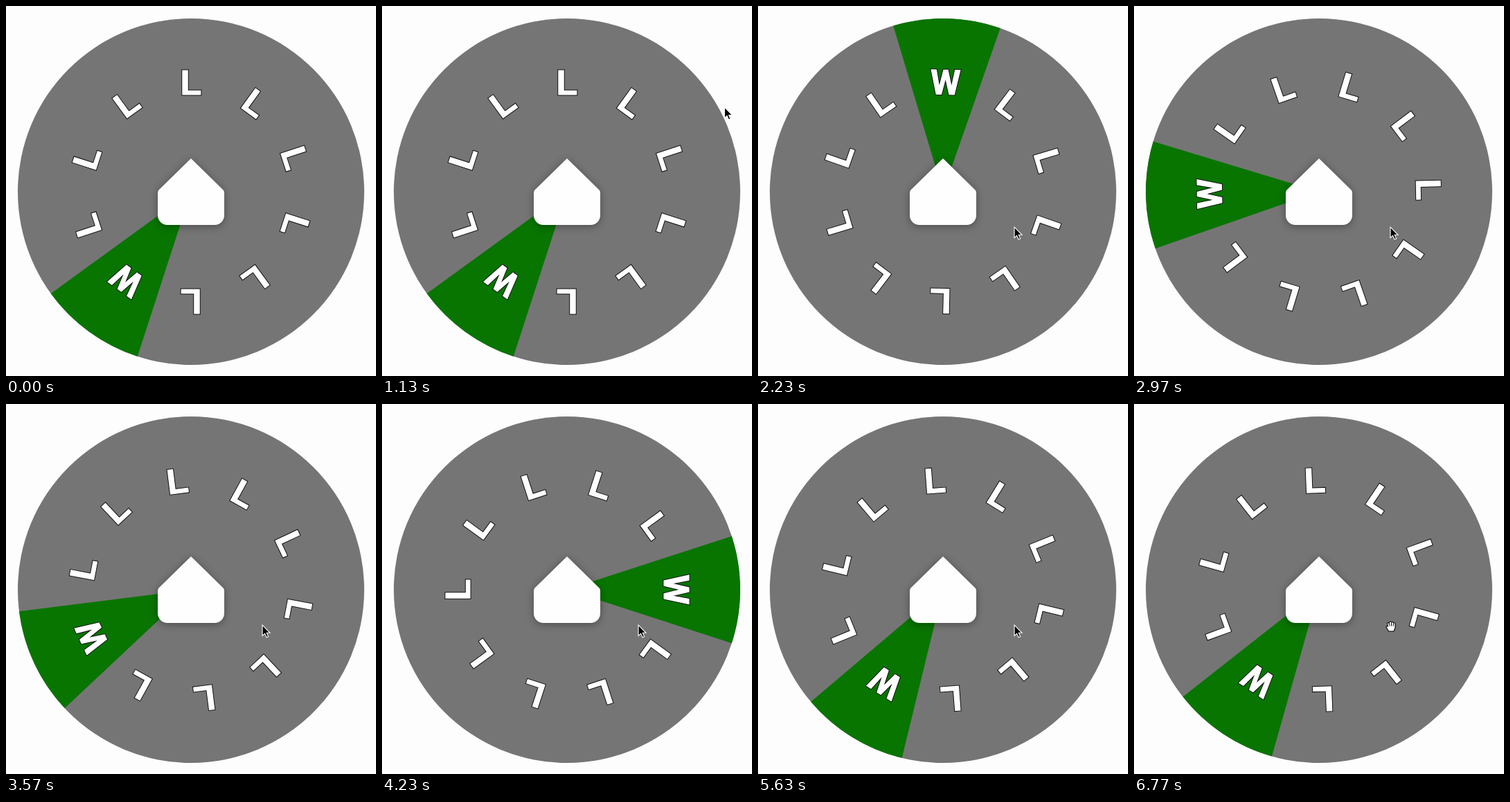
Write an HTML page that moves like this. It is 534 px wide and 534 px high and loops after 6.8 s.

```html
<!DOCTYPE html>
<html lang="en">
<head>
<meta charset="utf-8">
<title>Wheel</title>
<style>
  html, body { margin: 0; width: 100%; height: 100%; overflow: hidden; background: #fdfdfd; }
  svg { display: block; width: 100vw; height: 100vh; }
  text {
    font: bold 50.5px "Liberation Sans", Arial, sans-serif;
    text-anchor: middle;
    fill: #fff; stroke: #fff; stroke-width: 1.2;
  }
  .win { font: bold 49.5px Roboto, sans-serif; }
  .edge { stroke: #111; stroke-width: 3.2; }
  #hub { filter: drop-shadow(0 2px 6px rgba(0, 0, 0, .36)); }
</style>
</head>
<body>
<svg viewBox="0 0 534 534">
  <circle cx="267" cy="268" r="250" fill="#757575"/>
  <g id="wheel"></g>
  <path id="hub" fill="#fefefe"
    d="M267 220 L313.5 265.5 Q315 267 315 270 V302 A14 14 0 0 1 301 316 H233 A14 14 0 0 1 219 302 V270 Q219 267 220.5 265.5 Z"/>
  <g id="arrow">
    <path d="M0 0 V15.5 L3.6 12.3 L6 17.8 L8.6 16.7 L6.2 11.3 H11 Z" fill="#000" stroke="#fff" stroke-width="1.1"/>
  </g>
  <g id="hand" transform="translate(371 321)">
    <path d="M-3.5 7 L-7 1 Q-7.5 -1 -4.5 0 L-5.5 -4.5 Q-4.5 -6.5 -3 -4.5 L-2.5 -6 Q-1 -8 .5 -6 Q2.5 -7.5 3.5 -5 Q6 -6 6 -3.5 V2 L4 7 Z"
      fill="#fff" stroke="#000" stroke-width="1.1" stroke-linejoin="round"/>
    <path d="M-2.6 -4.5 L-2 -.5 M.5 -5.5 V-.5 M3.5 -4.5 L3 -.5" fill="none" stroke="#000"/>
  </g>
</svg>
<script>
const LOOP = 6800, SLICES = 10, RADIUS = 250, HAND_FROM = 6730;
const $ = id => document.getElementById(id);

// [ms, degrees, degrees per second]
const spin = [
  [1670, 216, 0], [1870, 332.5, 1130], [2230, 720.3, 1010], [2970, 1348.2, 680],
  [4230, 1889.8, 182], [5030, 1982.2, 72], [5820, 2013.8, 0]
];
// [ms, x, y]
const pointer = [[970, 513, 126], [1600, 440, 205], [1870, 387, 304.3], [2100, 370, 319]];

function build() {
  const half = Math.PI / SLICES;
  const x = RADIUS * Math.sin(half), y = -RADIUS * Math.cos(half);
  let parts = `<path fill="#087500" d="M0 0 L${-x} ${y} A${RADIUS} ${RADIUS} 0 0 1 ${x} ${y} Z"/>`;
  for (let i = 0; i < SLICES; i++) {
    const [letter, kind] = i === 0 ? ["W", "win"] : ["L", "lose"];
    // A wide dark copy behind the letter forms its outline.
    for (const layer of ["edge", ""]) {
      parts += `<text y="-140.5" class="${kind} ${layer}" transform="rotate(${i * 360 / SLICES})"${layer ? ' aria-hidden="true"' : ""}>${letter}</text>`;
    }
  }
  $("wheel").innerHTML = parts;
}

// Finds the key pair around t and the fraction between them.
function span(keys, t) {
  const last = keys.length - 1;
  let i = 0;
  while (i < last - 1 && t >= keys[i + 1][0]) i++;
  const a = keys[i], b = keys[i + 1];
  return { a, b, u: Math.min(1, Math.max(0, (t - a[0]) / (b[0] - a[0]))) };
}

function angleAt(t) {
  const { a, b, u } = span(spin, t);
  const seconds = (b[0] - a[0]) / 1000, w = 1 - u;
  return a[1] * (1 + 2 * u) * w * w + b[1] * u * u * (3 - 2 * u)
    + seconds * u * w * (a[2] * w - b[2] * u);
}

function pointerAt(t) {
  const { a, b, u } = span(pointer, t);
  return [1, 2].map(k => a[k] + (b[k] - a[k]) * u);
}

function draw(t) {
  $("wheel").setAttribute("transform", `translate(267 268) rotate(${angleAt(t)})`);
  $("arrow").setAttribute("transform", `translate(${pointerAt(t)})`);
  const grabbing = t >= HAND_FROM;
  $("arrow").style.display = t >= pointer[0][0] && !grabbing ? "" : "none";
  $("hand").style.display = grabbing ? "" : "none";
}

build();
const start = performance.now();
function tick() {
  draw((performance.now() - start) % LOOP);
  requestAnimationFrame(tick);
}
draw(0);
requestAnimationFrame(tick);
</script>
</body>
</html>
```
